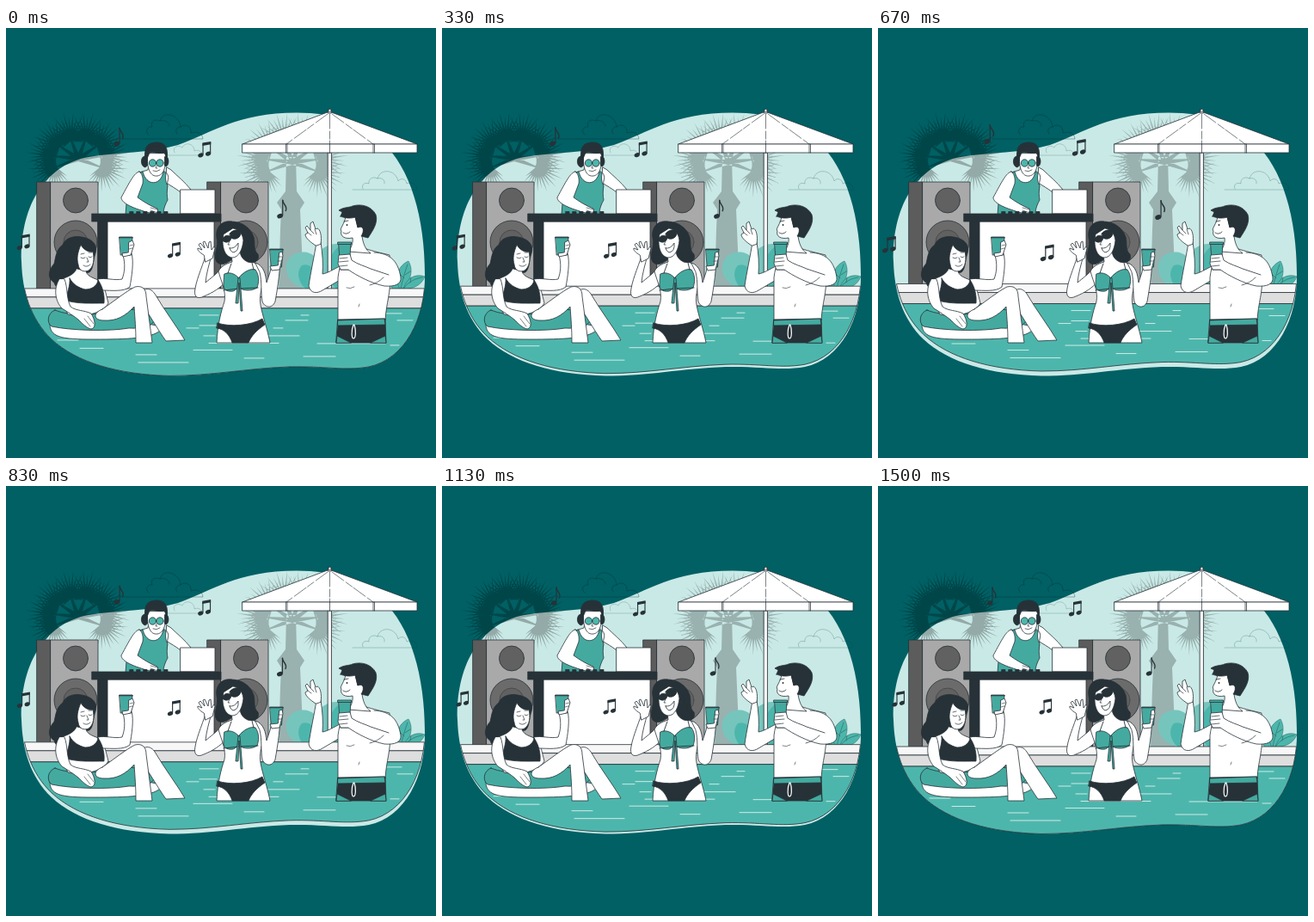
An HTML page with a canvas for the animation above (1540 ms loop, 500 by 500 pixels).

```html
<!DOCTYPE html>
<html lang="en">
<head>
<meta charset="utf-8">
<title>Pool party</title>
<style>
html, body { margin: 0; width: 100%; height: 100%; overflow: hidden; background: #006064; }
canvas { display: block; width: 100vw; height: 100vh; }
</style>
</head>
<body>
<canvas id="stage"></canvas>
<script>
const LOOP = 1540;
const INK = '#263238', TEAL = '#4db6ac', CLOTH = '#44aaa0', WHITE = '#fff';
const canvas = document.getElementById('stage');
const ctx = canvas.getContext('2d');

const shape = (d, fill, stroke = INK, width = 0.8) => {
  const path = typeof d === 'string' ? new Path2D(d) : d;
  if (fill) { ctx.fillStyle = fill; ctx.fill(path); }
  if (stroke) { ctx.strokeStyle = stroke; ctx.lineWidth = width; ctx.stroke(path); }
};
const line = (d, width = 0.8, color = INK) => shape(d, null, color, width);
const rect = (x, y, w, h, fill, stroke = INK) => shape(`M${x} ${y}h${w}v${h}h${-w}Z`, fill, stroke);
const disc = (x, y, rx, fill, stroke = INK, ry = rx, tilt = 0) => {
  const path = new Path2D();
  path.ellipse(x, y, rx, ry, tilt, 0, Math.PI * 2);
  shape(path, fill, stroke);
};

const blob = new Path2D('M18 272C16 212 42 160 96 150C132 144 165 146 200 136C240 122 268 98.5 338 98.5C383 99 411 108 437 132C471 163 487 222 487 286C488 338 464 385 422 394C395 399 370 393 330 394C278 396 240 404.5 190 404.5C130 403 82 389 53 362C28 338 19 306 18 272Z');

// Palm crown: fans of pointed spikes around hubs, all wound the same way.
function palm(cx, cy, size) {
  const path = new Path2D();
  const spike = (x, y, angle, length, half) => {
    const nx = -Math.sin(angle) * half, ny = Math.cos(angle) * half;
    path.moveTo(x + nx, y + ny);
    path.lineTo(x - nx, y - ny);
    path.lineTo(x + Math.cos(angle) * length, y + Math.sin(angle) * length);
    path.closePath();
  };
  for (let i = 0; i < 8; i++) {
    const angle = Math.PI * (-1.14 + 1.28 * i / 7);
    const x = cx + Math.cos(angle) * size * 0.48;
    const y = cy + Math.sin(angle) * size * 0.38;
    spike(cx, cy, Math.atan2(y - cy, x - cx), size * 0.6, 3);
    for (let k = -11; k <= 11; k++) {
      const length = size * (0.5 - 0.0014 * k * k) * (k % 2 ? 0.86 : 1);
      spike(x, y, angle + k * 0.19, length, 1.7);
    }
  }
  return path;
}
const leftPalm = palm(84, 152, 63);
const rightPalm = palm(333, 156, 67);
rightPalm.addPath(new Path2D('M326 150L325 190L315 203L320 211L319 234L317 304H346L343 234L342 211L347 203L338 190L337 150Z'));

function clouds() {
  const faint = 'rgba(0,45,48,.5)';
  line('M133 129H229C228 121 221 120 215 122C216 113 207 111 203 115C202 101 183 95 179 108C171 105 168 110 170 115C164 114 161 121 166 124M179 108C185 106 190 110 190 114M203 115C198 115 196 120 199 123', 0.7, faint);
  line('M188 148H228C228 143 223 141 219 143C219 134 208 132 205 139C199 135 193 139 196 145', 0.6, 'rgba(0,45,48,.3)');
  line('M403 188H478C478 180 470 179 466 181C465 175 459 174 456 178C453 164 435 163 432 175C426 172 421 176 422 181C416 179 413 183 415 187M432 175C438 173 441 178 440 181', 0.6, 'rgba(0,70,72,.4)');
}

function plants() {
  shape('M352 303C334 302 322 288 327 272C333 258 352 258 359 266C372 248 388 248 399 256L398 303Z', '#75c5bd', null);
  shape('M348 303C340 296 337 283 344 276C354 272 362 282 364 303ZM384 303C367 288 374 262 389 253C402 264 401 291 392 303Z', TEAL, null);
  const vein = '#26665f';
  shape('M450 304C445 298 445 291 448 286C454 289 458 296 459 304Z', TEAL, vein, 0.5);
  shape('M458 304C451 290 456 276 468 271C474 281 471 294 461 304Z', TEAL, vein, 0.5);
  shape('M462 304C465 291 476 285 487 289C483 300 473 303 462 304Z', TEAL, vein, 0.5);
  line('M459 304C461 291 465 281 467 275M463 291L458 286M464 287L470 283M462 303C468 295 476 291 484 290M470 296L471 290', 0.6, vein);
}

function speaker(x) {
  rect(x, 179, 16, 126, '#5c5c5c');
  rect(x + 16, 179, 55, 126, '#a9a9a9');
  disc(x + 45, 200.5, 14.5, '#616161');
  disc(x + 45, 249, 25, '#6b6b6b');
  disc(x + 45, 249, 14, '#616161', '#454545');
}

function dj() {
  shape('M187 162L192 165C199 172 208 179 215 188L203 191C198 187 191 183 186 180Z', WHITE);
  shape('M166 160L165 165L155 168C153 178 158 190 158 200L186 194L188 178C190 172 188 168 181 165L181 159Z', WHITE);
  shape('M154 169L159 167C163 184 180 184 183 167L186 169C185 176 186 181 188 183C187 190 187 195 188 200C184 207 183 212 183 217H139L140 204C147 194 155 182 154 169Z', CLOTH);
  shape('M155 167C149 168 144 179 134 197C134 204 149 210 167 215L177 215L176 210C168 207 160 202 153 197L159 181C160 174 158 169 155 167Z', WHITE);
  line('M168 209L176 211M168 212L174 214', 0.6);
  shape('M164 146C164 165 168 173 176 172C183 171 186 163 186 146Z', WHITE);
  shape('M162 151C160 137 166 133 176 133C185 133 189 140 187 151L184 145C177 147 171 143 167 145L164 152Z', INK);
  shape('M161 149C156 150 156 161 162 162L164.5 160V149ZM186 149C190 150 190 160 186 161L184.5 160V150Z', INK);
  line('M162 151C160 135 187 130 187 150', 1.6);
  disc(170.5, 157, 4.2, TEAL);
  disc(179, 157, 4.2, TEAL);
  line('M174 157H175M175 160L174 163H176M171 166Q175 168 179 165', 0.7);
}

function booth() {
  rect(118, 225, 124, 80, WHITE);
  rect(107, 225, 11, 80, INK);
  shape('M203 188H243V216H203Z', WHITE);
  rect(100, 216, 150, 9, INK);
  for (let x = 144; x < 190; x += 8) rect(x, 213.5, 4, 2.5, INK);
}

function umbrella() {
  rect(374.5, 145, 4, 161, '#f3f3f3');
  shape('M275 135L371 99Q376 96 381 99L478 135Z', WHITE);
  rect(275, 135, 203, 10, WHITE);
  ctx.setLineDash([17, 3, 9, 2]);
  line('M374 100L326 135M376.5 100V135M379 100L427 135', 0.6);
  ctx.setLineDash([]);
  line('M325.5 135V145M327 135V145M376.5 135V145M427 135V145M428.5 135V145', 0.7);
  rect(374.7, 95, 3.6, 4, WHITE);
  disc(376.5, 96, 1.7, WHITE);
}

const ripples = [
  [86, 113, 372.5], [151, 175, 380], [154, 212, 389], [277, 300, 384], [346, 383, 382],
  [218, 263, 374.5], [225, 247, 334], [225, 245, 346], [210, 224, 349], [325, 351, 340],
  [343, 352, 334], [304, 341, 358], [311, 322, 349], [442, 460, 332], [455, 473, 340],
  [447, 457, 369], [362, 441, 367], [60, 84, 363], [236, 317, 366.5], [230, 243, 358]
];

function pool(rise) {
  ctx.save();
  ctx.translate(0, rise);
  ctx.save();
  ctx.clip(blob);
  rect(10, 303, 485, 10, '#f7f7f7');
  rect(10, 313, 485, 13, '#dedede');
  rect(10, 326, 485, 90, TEAL);
  for (const [from, to, y] of ripples) line(`M${from} ${y}H${to}`, 0.9, 'rgba(255,255,255,.8)');
  ctx.restore();
  ctx.beginPath();
  ctx.rect(0, 303, 500, 120);
  ctx.clip();
  shape(blob, null, INK, 0.8);
  ctx.restore();
}

function cup(x, y) {
  shape(`M${x} ${y}h15l-1.5 21h-12Z`, CLOTH);
  line(`M${x - 0.3} ${y + 0.8}h15.6`, 1.1);
}

function floatingWoman() {
  shape('M51 342C50 360 64 362 102 362C142 362 168 361 179 352C182 348 176 346 170 345Z', WHITE);
  shape('M57 328C48 331 47 343 53 347C76 352 120 353 143 349C162 350 173 345 172 338C172 329 150 326 130 328C105 334 76 336 57 328Z', CLOTH);
  shape('M92 244C80 240 69 244 66 252C58 258 58 266 56 274C49 282 48 291 56 296C59 306 68 305 72 300L80 287L97 284C102 280 101 270 104 262C107 253 101 246 92 244Z', INK);
  shape('M82 280C79 288 69 290 62 293C59 302 61 314 67 322L72 333C90 337 112 332 119 320L113 296C106 291 95 291 93 283Z', WHITE);
  shape('M107 292C116 290 126 294 135 292C138 284 139 275 136 264L146 262C149 272 146 290 144 301C137 307 123 305 112 305Z', WHITE);
  shape('M74 291C75 300 70 310 70 317C84 321 100 320 114 320C115 310 112 300 107 293C106 301 98 304 92 304C84 302 78 298 74 291Z', INK);
  shape('M87 252C83 262 82 268 84 275C85 283 91 284 96 282C102 278 103 268 101 260C96 261 90 258 87 252Z', WHITE);
  line('M87 267Q90 269 92 267M96 266Q98 268 100 266M94 267L96 272H94M90 276Q94 279 98 275M87 263L91 262M96 261L100 261', 0.7);
  shape('M149 319C156 303 166 299 173 309C184 328 198 346 208 363L186 364C176 350 165 330 158 322Z', WHITE);
  shape('M112 327C125 318 140 306 150 301C159 299 163 304 163 312C165 330 168 348 170 366L151 366C151 350 150 338 149 324C139 335 128 341 114 340C101 340 101 331 112 327Z', WHITE);
  shape('M62 292C55 303 57 317 65 326C73 331 79 335 84 339C89 344 94 349 99 350C105 349 104 340 99 332C91 328 81 329 75 324C70 314 72 302 68 292Z', WHITE);
  line('M91 338L98 347M95 335L102 344', 0.6);
  cup(132, 243);
  shape('M143 249L147 247L149 252L145 264L136 266L135 262L142 261Z', WHITE);
  line('M144 253L148 252M143 257L147 256', 0.6);
}

function dancingWoman() {
  shape('M262 225C251 223 243 232 245 244C248 254 240 264 245 272C252 279 260 270 266 268L284 272C290 274 295 270 293 263C287 258 290 250 288 243C284 231 273 225 262 225Z', INK);
  shape('M234 258C230 274 222 290 220 303C218 312 222 316 230 312C240 308 250 302 256 294L251 279C246 285 238 291 232 296C233 285 236 276 239 264Z', WHITE);
  shape('M262 262L263 272C256 274 250 277 247 283C251 297 256 306 254 318C250 330 246 345 245 366H307C304 350 298 334 296 322C294 312 298 300 300 288C300 280 296 275 289 273C282 272 276 270 275 260Z', WHITE);
  shape('M290 273C300 276 302 287 303 296L307 284C309 277 309 270 308 262L318 262C320 277 316 301 313 318C309 328 300 324 298 318C296 308 298 295 295 284Z', WHITE);
  shape('M273 238C284 243 281 258 288 264C292 270 288 274 281 272C272 268 270 259 275 252Z', INK);
  shape('M230 264C225 261 222 258 223 256L228 258L224 252L226 250L231 256L229 249L231 248L235 256L236 249L238 248L239 258L242 254L243 256L240 268L232 272Z', WHITE);
  shape('M254 286C260 283 266 286 270 290C272 298 270 304 264 306C256 307 252 304 253 296ZM271 290C276 284 284 279 290 281C295 288 294 296 292 302C286 306 276 306 271 302Z', CLOTH);
  line('M258 285L262 274M288 281L286 273M253 305L271 303L293 302', 0.9);
  shape('M270 291L267 320L270 320L271 296L273 329L275 329L272 291Z', CLOTH);
  shape('M246 343C260 348 285 346 298 338L301 345C292 351 285 358 282 366H263C260 357 254 350 245 349Z', INK);
  shape('M253 240C250 253 254 266 263 267C271 267 275 257 276 247C275 238 270 234 264 233Z', WHITE);
  shape('M251 246C254 240 260 240 262 244C261 250 254 251 251 246ZM260 239C265 233 273 234 273 239C272 246 263 247 261 243Z', INK);
  shape('M260 256Q266 257 270 250Q271 260 264 261Q261 260 260 256Z', WHITE);
  line('M260 248L258 252H260', 0.7);
  cup(307, 257);
  shape('M318 261L321 260L322 265L318 281L309 282L307 277L316 276Z', WHITE);
  line('M317 266L321 266M316 271L320 271', 0.6);
}

function man() {
  shape('M361 249C359 263 354 285 352 300C354 309 362 309 368 305L390 292V276C380 281 374 285 368 286C369 275 368 262 366 249Z', WHITE);
  shape('M360 253C354 249 348 244 348 240L351 238L348 232L350 230L354 235L354 227L357 225L360 234C364 230 368 240 366 251Z', WHITE);
  line('M351 238L355 241M354 235L358 239M359 234L361 240', 0.7);
  shape('M402 256C392 264 388 275 386 290C386 310 386 325 386 341L441 340C442 320 448 305 446 292L446 264C438 262 428 260 416 256Z', WHITE);
  shape('M395 219C394 228 387 234 390 236C388 242 394 246 403 244C404 250 401 256 398 260L424 262C418 258 415 250 414 242C419 236 414 227 409 232L406 219Z', WHITE);
  shape('M389 219L391 214L387 212C393 208 399 209 403 207C413 204 425 207 430 217C433 227 426 236 421 244L413 242C417 236 416 229 409 232L406 220C400 222 394 221 389 219Z', INK);
  disc(396.5, 229, 1, INK, null);
  line('M393 225L398 224M392 238Q396 241 400 237', 0.8);
  shape('M386 339L441 338L442 366H384Z', INK);
  shape('M386 340L440 338L441 345L386 346Z', CLOTH);
  shape('M384 366L385 358L401 366ZM442 366L441 358L424 366Z', CLOTH);
  line('M404 345C401 352 402 361 404 361C407 361 407 351 405 345', 1.2, WHITE);
  line('M396 302Q400 304 405 301M411 321L410 324', 0.6);
  shape('M387 250H401L399 281H389Z', CLOTH);
  rect(386, 249, 15.5, 2.5, CLOTH);
  shape('M428 261C448 262 456 272 459 290C460 298 452 301 440 300C425 297 408 288 398 281L389 281L386 274L387 264L400 263L402 270C409 275 418 277 424 280L439 285L445 287', WHITE);
  line('M388 268L397 267M387 272L398 271M388 277L397 276M423 299Q432 297 439 290', 0.7);
}

function singleNote(x, y) {
  disc(x, y, 3.4, INK, null, 2.5, -0.4);
  line(`M${x + 3} ${y - 1}V${y - 18}`, 1.1);
  line(`M${x + 3} ${y - 18}c0 5 6 6 3.5 12`, 1.3);
}

function beamedNote(x, y) {
  disc(x, y, 3.1, INK, null, 2.3, -0.4);
  disc(x + 8.5, y - 1.7, 3.1, INK, null, 2.3, -0.4);
  line(`M${x + 2.6} ${y - 1}v-12M${x + 11} ${y - 2.5}v-12`, 1.1);
  shape(`M${x + 2} ${y - 14}l9.6 -1.7v3.2l-9.6 1.7Z`, INK, null);
}

function notes(scale) {
  ctx.save();
  ctx.translate(170, 190);
  ctx.scale(scale, scale);
  ctx.translate(-170, -190);
  singleNote(130, 136);
  singleNote(315, 218);
  beamedNote(19.5, 254);
  beamedNote(190.5, 263);
  beamedNote(225, 149);
  ctx.restore();
}

// Linear rise to the peak, then linear fall.
const pulse = (t, start, peak, end) =>
  Math.max(0, Math.min((t - start) / (peak - start), (end - t) / (end - peak)));

function draw(t) {
  ctx.fillStyle = '#006064';
  ctx.fillRect(0, 0, 500, 500);
  shape(blob, '#c9e9e6', null);
  clouds();
  shape(leftPalm, 'rgba(0,0,0,.27)', null);
  shape(rightPalm, 'rgba(0,0,0,.24)', null);
  plants();
  speaker(36);
  speaker(234);
  dj();
  booth();
  umbrella();
  pool(-2.75 * (1 - Math.cos((t + 60) / LOOP * Math.PI * 2)));
  floatingWoman();
  dancingWoman();
  man();
  const local = t > 1500 ? t - LOOP : t;
  notes(1 + 0.098 * (pulse(local, -40, 120, 430) + 0.9 * pulse(local, 540, 695, 880)));
}

function fit() {
  const ratio = window.devicePixelRatio || 1;
  canvas.width = Math.round(innerWidth * ratio);
  canvas.height = Math.round(innerHeight * ratio);
  ctx.setTransform(canvas.width / 500, 0, 0, canvas.height / 500, 0, 0);
  ctx.lineJoin = ctx.lineCap = 'round';
}
fit();
addEventListener('resize', fit);

const began = performance.now();
function tick() {
  draw((performance.now() - began) % LOOP);
  requestAnimationFrame(tick);
}
tick();
</script>
</body>
</html>
```
